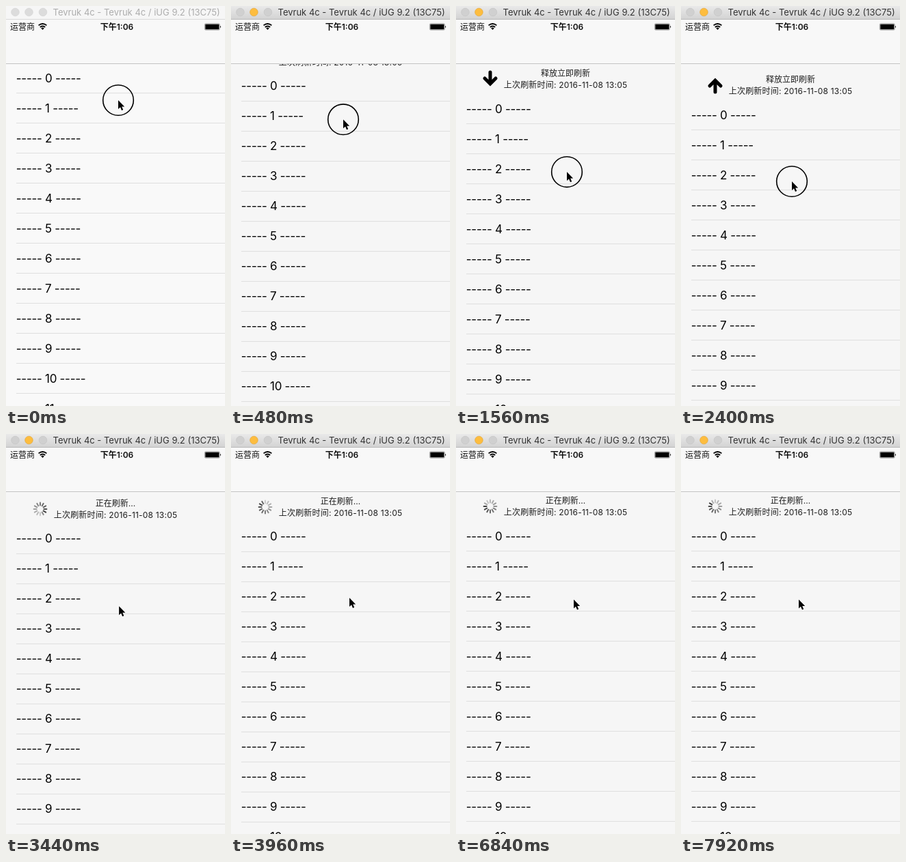
An HTML page that plays this animation: 320 by 586 pixels, repeating every 8000 ms.

```html
<!DOCTYPE html>
<html lang="zh-CN">
<head>
<meta charset="utf-8">
<title>Pull to refresh</title>
<style>
  html, body { margin: 0; width: 100%; height: 100%; overflow: hidden; background: #f7f7f7; }
  svg { display: block; width: 100vw; height: 100vh; }
  text { font-family: Inter, "Noto Sans CJK SC", "Noto Sans CJK", sans-serif; fill: #111; }
  .row { font-size: 17px; letter-spacing: -.28px; fill: #000; }
  .head { font-size: 12px; text-anchor: middle; fill: #1c1c1c; }
  .date { letter-spacing: .2px; }
  .status { font-size: 12px; }
</style>
</head>
<body>
<svg viewBox="0 0 320 586" preserveAspectRatio="none">
  <defs>
    <linearGradient id="bar" x1="0" y1="0" x2="0" y2="1">
      <stop offset="0" stop-color="#e9e9e9"/><stop offset="1" stop-color="#d2d2d2"/>
    </linearGradient>
  </defs>
  <rect id="paper" width="320" height="586" fill="#f7f7f7"/>
  <g id="content">
    <g id="rows"></g>
    <text id="state" class="head" x="160" y="58"></text>
    <text class="head date" x="160" y="75">上次刷新时间: 2016-11-08 13:05</text>
    <path id="arrow" d="M0-10V6M-8-1L0 7L8-1" fill="none" stroke="#000" stroke-width="5" stroke-linecap="round"/>
    <g id="spinner" transform="translate(50 62)" stroke="#333" stroke-width="2" stroke-linecap="round"></g>
  </g>
  <rect y="20" width="320" height="64" fill="#f8f8f8"/>
  <path d="M0 84.5H320" stroke="#c4c4c4"/>
  <text class="status" x="6" y="34.5">运营商</text>
  <text class="status" x="162" y="34.5" text-anchor="middle" font-weight="600">下午1:06</text>
  <g fill="none" stroke="#000" stroke-width="1.9">
    <path d="M47.6 28.4Q53.5 23.4 59.4 28.4M49.8 31Q53.5 27.8 57.2 31"/>
    <path d="M53.5 35L51.2 32.4Q53.5 30.8 55.8 32.4Z" fill="#000" stroke="none"/>
  </g>
  <rect x="290.4" y="25.9" width="21.8" height="9.2" rx="1.5" fill="#f8f8f8" stroke="#555" stroke-width=".6"/>
  <rect x="291.3" y="26.8" width="20" height="7.4" rx=".6"/>
  <path d="M313 29Q315 30.5 313 32Z"/>
  <rect id="titlebar" width="320" height="20"/>
  <path id="edge" d="M0 19.5H320"/>
  <g id="lights"></g>
  <text id="title" x="68.5" y="14" font-size="13">Tevruk 4c - Tevruk 4c / iUG 9.2 (13C75)</text>
  <g id="pointer">
    <circle id="touch" r="22.3" fill="none" stroke="#000" stroke-width="1.6"/>
    <path d="M0 0V13L3 10.3L5 15L7.2 14.1L5.2 9.5H9.2Z" stroke="#fff" stroke-width="1" paint-order="stroke"/>
  </g>
</svg>
<script>
const LOOP = 8000, ACTIVATE = 80, READY = 1540, TURN = 1560, RELEASE = 3160;
const $ = id => document.getElementById(id);
const set = (el, attrs) => {
  for (const key in attrs) el.setAttribute(key, attrs[key]);
  return el;
};
const add = (parent, tag, attrs) =>
  parent.appendChild(set(document.createElementNS("http://www.w3.org/2000/svg", tag), attrs));
const clamp = v => Math.max(0, Math.min(1, v));
const smooth = v => { v = clamp(v); return v * v * (3 - 2 * v); };

// Monotone cubic curve through [time, value] points
function curve(points) {
  const slope = i => {
    const [a, b] = [points[i], points[i + 1]];
    return a && b ? (b[1] - a[1]) / (b[0] - a[0]) : 0;
  };
  const tangent = i => {
    const p = slope(i - 1), q = slope(i);
    return p * q > 0 ? 2 * p * q / (p + q) : 0;
  };
  return t => {
    if (t <= points[0][0]) return points[0][1];
    const i = points.findIndex((p, k) => points[k + 1] && t < points[k + 1][0]);
    if (i < 0) return points[points.length - 1][1];
    const [t0, v0] = points[i], [t1, v1] = points[i + 1];
    const h = t1 - t0, u = (t - t0) / h, w = 1 - u;
    return v0 * (1 + 2 * u) * w * w + v1 * u * u * (3 - 2 * u)
      + h * u * w * (tangent(i) * w - tangent(i + 1) * u);
  };
}

const pull = curve([[40, 0], [880, 28], [1560, 45], [2400, 54], [RELEASE, 54],
  [3560, 46], [3960, 45], [4600, 44]]);
const pointerX = curve([[880, 164], [1560, 162], [RELEASE, 162], [3960, 173], [4800, 172]]);
const pointerY = curve([[40, 138], [880, 204], [1560, 243], [2400, 257], [RELEASE, 257],
  [3960, 240], [4800, 242.5]]);

for (let i = 0; i < 12; i++) {
  add($("rows"), "text", { class: "row", x: 14.8, y: 111.5 + 44 * i }).textContent = `----- ${i} -----`;
  add($("rows"), "path", { d: `M15 ${127.5 + 44 * i}H320`, stroke: "#dfdfdf" });
}
const spokes = Array.from({ length: 12 }, (_, i) =>
  add($("spinner"), "path", { d: "M0-5.4V-9.4", transform: `rotate(${i * 30})` }));
const lights = [13.5, 33.5, 54].map(cx =>
  add($("lights"), "circle", { cx, cy: 9, r: 5.8, "stroke-width": .6 }));

function render(t) {
  const active = t >= ACTIVATE, refreshing = t >= RELEASE;
  set($("titlebar"), { fill: active ? "url(#bar)" : "#f6f6f6" });
  set($("edge"), { stroke: active ? "#b9b9b9" : "#d9d9d9" });
  $("title").style.fill = active ? "#333" : "#adadad";
  lights.forEach((light, i) => {
    const lit = active && i === 1;
    set(light, { fill: lit ? "#fdbd3f" : active ? "#d0d0d0" : "#dcdcdc",
      stroke: lit ? "#e0a030" : active ? "#c2c2c2" : "#d0d0d0" });
  });
  set($("paper"), { fill: active ? "#f6f6f6" : "#f9f9f9" });

  set($("content"), { transform: `translate(0 ${pull(t)})` });
  $("state").textContent = refreshing ? "正在刷新..." : t >= READY ? "释放立即刷新" : "下拉刷新";
  set($("arrow"), {
    transform: `translate(50 62) rotate(${-180 * smooth((t - TURN) / 250)})`,
    visibility: refreshing ? "hidden" : "visible"
  });
  set($("spinner"), { visibility: refreshing ? "visible" : "hidden" });
  const head = (t - 5760) / 1000 * 12 + 8.3;
  spokes.forEach((spoke, i) => {
    const age = (((head - i) % 12) + 12) % 12;
    const fade = age > 11 ? age - 11 : 1 - age / 11;
    set(spoke, { opacity: .2 + .75 * fade });
  });

  set($("pointer"), { transform: `translate(${pointerX(t)} ${pointerY(t)})` });
  set($("touch"), { visibility: refreshing ? "hidden" : "visible" });
}

const start = performance.now();
function tick() {
  render((performance.now() - start) % LOOP);
  requestAnimationFrame(tick);
}
render(0);
requestAnimationFrame(tick);
</script>
</body>
</html>
```
